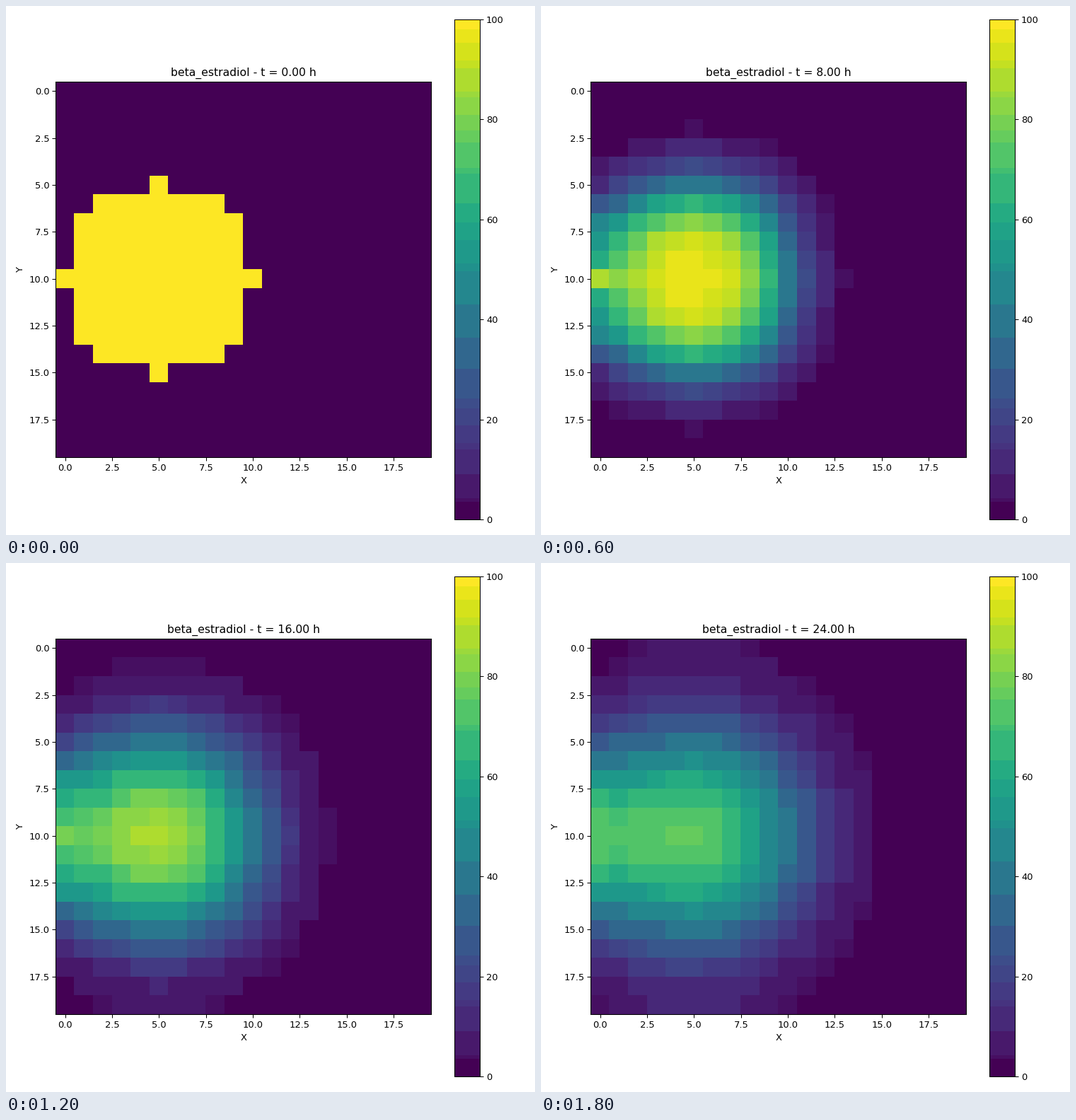
Animation, 748 px wide and 748 px high, one loop 2 s. Source, as a matplotlib script:

```python
import numpy as np
import matplotlib.pyplot as plt
from matplotlib.animation import FuncAnimation
from matplotlib.colors import ListedColormap

GRID = 20
FRAMES = 10
HOURS = 24
RATE = 0.2      # diffusion, cells^2 per hour
SUBSTEPS = 100

# Levels (0-100) at which the stepped colour scale changes
LEVELS = [3.2, 4.1, 8.8, 14, 15.1, 18.8, 22.2, 24.3, 30.1, 36.4, 43.1, 49.6,
          51.3, 55.7, 59.4, 63.4, 69.3, 70.4, 75.5, 77.7, 81, 84.4, 85.6,
          90.4, 92.1, 95.5, 98.4]


def stepped_viridis():
    colors = plt.get_cmap("viridis")(np.arange(256))
    band = np.digitize(np.linspace(0, 100, 256), LEVELS)
    steps = np.array([colors[band == b].mean(axis=0)
                      for b in range(len(LEVELS) + 1)])
    steps[0], steps[-1] = colors[0], colors[-1]
    return ListedColormap(steps[band])


def laplacian(u):
    """Five-point stencil; edge cells exchange only with their inner neighbour."""
    lap = np.zeros_like(u)
    lap[1:-1, 1:-1] = (u[:-2, 1:-1] + u[2:, 1:-1] + u[1:-1, :-2]
                       + u[1:-1, 2:] - 4 * u[1:-1, 1:-1])
    lap[0], lap[-1] = u[1] - u[0], u[-2] - u[-1]
    lap[:, 0], lap[:, -1] = u[:, 1] - u[:, 0], u[:, -2] - u[:, -1]
    return lap


def simulate():
    y, x = np.mgrid[:GRID, :GRID]
    u = np.where((x - 5) ** 2 + (y - 10) ** 2 <= 25, 100.0, 0.0)
    dt = HOURS / (FRAMES - 1) / SUBSTEPS
    fields = [u]
    for _ in range(FRAMES - 1):
        for _ in range(SUBSTEPS):
            u = u + RATE * dt * laplacian(u)
        fields.append(u)
    return fields


def caption(i):
    return f"beta_estradiol - t = {HOURS * i / (FRAMES - 1):.2f} h"


fields = simulate()
fig, ax = plt.subplots(figsize=(8, 8), dpi=93.5, facecolor="white")
image = ax.imshow(fields[0], cmap=stepped_viridis(), vmin=0, vmax=100,
                  interpolation="nearest")
fig.colorbar(image, ax=ax)
ax.set_xlabel("X")
ax.set_ylabel("Y")
title = ax.set_title(caption(0))
fig.tight_layout()


def update(i):
    image.set_data(fields[i])
    title.set_text(caption(i))
    return image, title


anim = FuncAnimation(fig, update, frames=FRAMES, interval=200,
                     repeat=True, repeat_delay=0)
plt.show()
```
